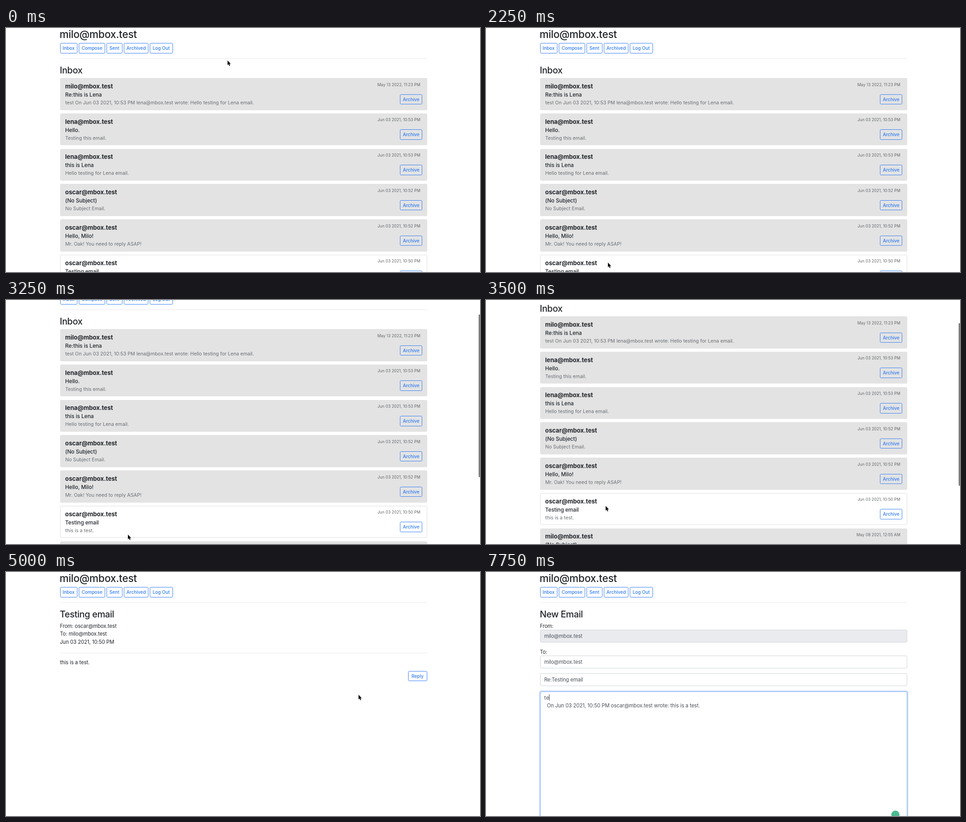
Animation, 1042 px wide and 537 px high, one loop 8000 ms. Source, as an HTML page:

```html
<!DOCTYPE html>
<html lang="en">
<head>
<meta charset="utf-8">
<title>Mail</title>
<style>
html, body { margin: 0; width: 100%; height: 100%; overflow: hidden; background: #fff; }
#stage {
  position: absolute; left: 0; top: 0; width: 1042px; height: 537px; overflow: hidden;
  font: 430 11.2px Inter, "Liberation Sans", sans-serif; font-optical-sizing: none;
  letter-spacing: -.005em; color: #212529;
}
#stage * { position: absolute; box-sizing: border-box; }
#page, .view { left: 0; top: 0; width: 1042px; height: 700px; }
.t { white-space: pre; line-height: 18px; }
.h2 { font-size: 22.5px; font-weight: 540; letter-spacing: -.012em; }
.h3 { font-size: 19.7px; font-weight: 540; letter-spacing: -.02em; }
.sender { font-size: 13.2px; font-weight: 700; }
.subject { font-size: 11.8px; font-weight: 500; }
.preview { font-size: 10.65px; letter-spacing: 0; color: #6a6d71; }
.date { font-size: 8.75px; letter-spacing: 0; color: #626569; }
.input { color: #495057; }
.btn {
  height: 22.4px; border: 1px solid #3a80f5; border-radius: 2.5px; color: #2f7bf6;
  font-size: 10px; font-weight: 460; line-height: 20.4px; letter-spacing: 0;
  text-align: center; white-space: pre;
}
.rule { left: 118.5px; width: 807px; height: 1px; background: #e9e9e9; }
.card { left: 118.5px; width: 807px; height: 70.5px; border-radius: 3px; background: #e3e3e3; }
.card.unread { background: #fff; border: 1px solid #dfdfdf; }
.field { left: 118.5px; width: 807px; height: 28px; border: 1px solid #ced4da; border-radius: 3px; background: #fff; }
.off { background: #e9ebef; }

/* every change is a hard cut on a 250 ms grid (3.125% of the loop) */
.anim { animation: 8s step-end infinite; }
#page { animation-name: scroll; }
#thumb {
  left: 1038.5px; top: 0; width: 5px; height: 357.5px; border-radius: 2px;
  background: #7f7f7f; animation-name: thumb;
}
#inbox { animation-name: inbox; }
#mail { animation-name: mail; }
#form { animation-name: form; }
#focus { left: 0; top: 0; width: 1042px; height: 537px; animation-name: focus; }
#ring {
  left: 118.5px; top: 262.5px; width: 807px; height: 400px; border: 1px solid #86b3f8;
  border-radius: 3px; box-shadow: 0 0 0 2.3px rgba(47, 123, 246, .27);
}
#badge { left: 891px; top: 524.5px; width: 18px; height: 18px; border-radius: 50%; background: #4dba92; }
#caret { left: 127.6px; top: 269px; width: 1px; height: 14px; background: #33373b; animation-name: caret; }
#key1 { animation-name: key1; }
#key2 { animation-name: key2; }
#cursor { left: 0; top: 0; width: 12px; height: 16px; overflow: visible; animation-name: cursor; }

@keyframes scroll {
  0% { transform: none; }
  37.5% { transform: translateY(-3.6px); }
  40.625% { transform: translateY(-46px); }
  43.75% { transform: translateY(-74.2px); }
  46.875%, 100% { transform: none; }
}
@keyframes thumb {
  0% { opacity: 0; transform: none; }
  37.5% { opacity: 1; transform: translateY(3px); }
  40.625% { opacity: 1; transform: translateY(31.5px); }
  43.75% { opacity: 1; transform: translateY(50.5px); }
  46.875%, 100% { opacity: 0; transform: none; }
}
@keyframes inbox { 0% { opacity: 1; } 46.875%, 100% { opacity: 0; } }
@keyframes mail { 0% { opacity: 0; } 50% { opacity: 1; } 68.75%, 100% { opacity: 0; } }
@keyframes form { 0% { opacity: 0; } 71.875%, 100% { opacity: 1; } }
@keyframes focus { 0% { opacity: 0; } 87.5%, 100% { opacity: 1; } }
@keyframes key1 { 0% { opacity: 0; } 93.75%, 100% { opacity: 1; } }
@keyframes key2 { 0% { opacity: 0; } 96.875%, 100% { opacity: 1; } }
@keyframes caret {
  0% { transform: none; }
  93.75% { transform: translateX(4px); }
  96.875%, 100% { transform: translateX(10.6px); }
}
@keyframes cursor {
  0% { transform: translate(487px, 71.5px); opacity: 1; }
  3.125% { transform: translate(487px, 71.5px); animation-timing-function: steps(9, start); }
  31.25%, 40.625% { transform: translate(268px, 516.3px); }
  43.75% { transform: translate(263px, 453.3px); }
  46.875% { transform: translate(263px, 449px); }
  53.125% { transform: translate(263px, 449px); animation-timing-function: steps(5, start); }
  68.75% { transform: translate(903px, 225.5px); }
  81.25% { transform: translate(560px, 248px); }
  84.375% { transform: translate(200px, 272px); opacity: 1; }
  87.5%, 100% { transform: translate(200px, 272px); opacity: 0; }
}
</style>
</head>
<body>
<div id="stage">
  <div id="page" class="anim">
    <div id="head" class="view"></div>
    <div id="inbox" class="view anim"></div>
    <div id="mail" class="view anim"></div>
    <div id="form" class="view anim"></div>
  </div>
  <div id="focus" class="anim">
    <div id="ring"></div>
    <div id="badge"></div>
    <div id="caret" class="anim"></div>
  </div>
  <div id="thumb" class="anim"></div>
  <svg id="cursor" class="anim" viewBox="0 0 12 16">
    <path d="M0 0V10.2L2.3 8.1L3.9 11.9L5.7 11.1L4.1 7.4H7.2Z" fill="#000" stroke="#fff" stroke-width="1.2" paint-order="stroke" stroke-linejoin="round"/>
  </svg>
</div>
<script>
const $ = id => document.getElementById(id);
const MILO = "milo@mbox.test", LENA = "lena@mbox.test", OSCAR = "oscar@mbox.test";
const LEFT = 118.5, LINE = 18;

function add(parent, cls, style, text = "") {
  const el = document.createElement("div");
  el.className = cls;
  el.textContent = text;
  for (const k in style) el.style[k] = style[k] + "px";
  parent.append(el);
  return el;
}
// y is the middle of the line
const write = (parent, cls, x, y, text) =>
  add(parent, "t " + cls, { left: x, top: y - LINE / 2 }, text);
const writeRight = (parent, cls, x, y, text) =>
  add(parent, "t " + cls, { right: 1042 - x, top: y - LINE / 2 }, text);
const button = (parent, x, y, width, text) =>
  add(parent, "btn", { left: x, top: y, width }, text);

const head = $("head");
write(head, "h2", 117.7, 13.7, MILO);
[["Inbox", 118.5, 38.5], ["Compose", 160, 58], ["Sent", 221, 34.5],
 ["Archived", 259, 54], ["Log Out", 316, 50.5]]
  .forEach(([label, x, w]) => button(head, x, 33.3, w, label));
add(head, "rule", { top: 67 });

const inbox = $("inbox");
write(inbox, "h3", LEFT - .3, 92.6, "Inbox");
[
  [MILO, "Re:this is Lena", `test On Jun 03 2021, 10:53 PM ${LENA} wrote: Hello testing for Lena email.`, "May 13 2022, 11:23 PM"],
  [LENA, "Hello.", "Testing this email.", "Jun 03 2021, 10:53 PM"],
  [LENA, "this is Lena", "Hello testing for Lena email.", "Jun 03 2021, 10:53 PM"],
  [OSCAR, "(No Subject)", "No Subject Email.", "Jun 03 2021, 10:52 PM"],
  [OSCAR, "Hello, Milo!", "Mr. Oak! You need to reply ASAP!", "Jun 03 2021, 10:52 PM"],
  [OSCAR, "Testing email", "this is a test.", "Jun 03 2021, 10:50 PM", "unread"],
  [MILO, "(No Subject)", "", "May 08 2021, 12:55 AM"]
].forEach(([from, subject, preview, date, state = ""], i) => {
  const y = 110.1 + i * 77.75;
  add(inbox, "card " + state, { top: y });
  write(inbox, "sender", 130.1, y + 17.7, from);
  write(inbox, "subject", 130.1, y + 36.8, subject);
  write(inbox, "preview", 130.2, y + 54.8, preview);
  writeRight(inbox, "date", 910.8, y + 14.6, date);
  button(inbox, 866.4, y + 35.6, 48.5, "Archive");
});

const mail = $("mail");
write(mail, "h3", LEFT - .3, 92.6, "Testing email");
["From: " + OSCAR, "To: " + MILO, "Jun 03 2021, 10:50 PM"]
  .forEach((line, i) => write(mail, "", LEFT, 118.9 + i * 17.45, line));
add(mail, "rule", { top: 178 });
write(mail, "", LEFT, 198.5, "this is a test.");
button(mail, 884, 218, 41.5, "Reply");

const form = $("form");
write(form, "h3", LEFT - .3, 92.6, "New Email");
write(form, "", LEFT, 118.9, "From:");
add(form, "field off", { top: 127.2 });
write(form, "input", 127.9, 141.4, MILO);
write(form, "", LEFT, 175.5, "To:");
add(form, "field", { top: 183.8 });
write(form, "input", 127.9, 198, MILO);
add(form, "field", { top: 223.2 });
write(form, "input", 127.9, 237.3, "Re:Testing email");
add(form, "field", { top: 262.5, height: 400 });
write(form, "input", 127.9, 294, `  On Jun 03 2021, 10:50 PM ${OSCAR} wrote: this is a test.`);

[["t", 127.9], ["e", 131.9]].forEach(([key, x], i) =>
  write($("focus"), "input anim", x, 276.5, key).id = "key" + (i + 1));
</script>
</body>
</html>
```
